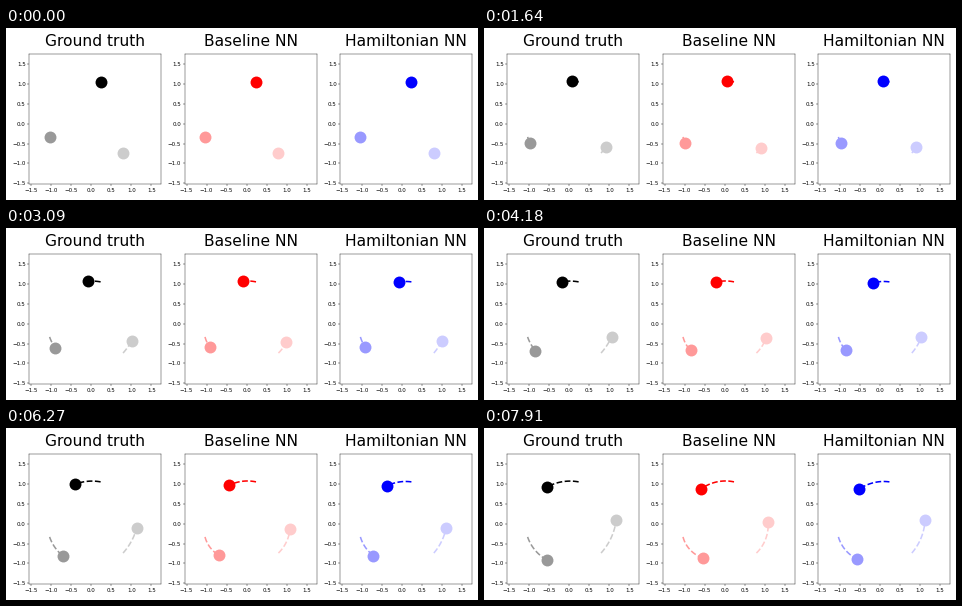
A matplotlib script for the animation above (8000 ms loop, 472x172 px).

```python
import numpy as np
import matplotlib.pyplot as plt
from matplotlib.animation import FuncAnimation
from matplotlib.colors import to_rgb

W, H, DPI = 472, 172, 56
FRAMES, LOOP = 88, 8000

# axes layout in pixels, measured from the top left
AX_W, AX_H, AX_TOP = 131.9, 130, 26.3
AX_LEFT, AX_STEP = 23.3, 155.4

START = [(0.235, 1.059), (-1.038, -0.332), (0.795, -0.739)]
STRENGTH = [1, 0.4, 0.2]

# title, colour, swing angle of the pull, end point of each body
PANELS = [
    ("Ground truth", "black", 0.73,
     [(-0.555, 0.927), (-0.55, -0.918), (1.17, 0.099)]),
    ("Baseline NN", "red", 0.83,
     [(-0.592, 0.878), (-0.535, -0.873), (1.084, 0.045)]),
    ("Hamiltonian NN", "blue", 0.75,
     [(-0.524, 0.875), (-0.574, -0.892), (1.122, 0.095)]),
]


def tint(color, strength):
    return tuple(1 - strength * (1 - c) for c in to_rgb(color))


def orbit(start, end, swing):
    """Harmonic motion around the origin, one row per frame."""
    s = np.linspace(0, 1, FRAMES)
    path = (np.outer(np.sin(swing * (1 - s)), start)
            + np.outer(np.sin(swing * s), end))
    return path / np.sin(swing)


def make_axes(fig, i, title):
    left = AX_LEFT + i * AX_STEP
    ax = fig.add_axes([left / W, 1 - (AX_TOP + AX_H) / H, AX_W / W, AX_H / H])
    ticks = np.arange(-1.5, 1.6, 0.5)
    ax.set(xticks=ticks, yticks=ticks,
           xlim=(-1.545, 1.7475), ylim=(-1.529, 1.756))
    ax.tick_params(labelsize=7, length=2.6, pad=1.9, width=0.5)
    for spine in ax.spines.values():
        spine.set_linewidth(0.5)
    ax.set_title(title, fontsize=20, pad=10.3)
    return ax


plt.rcParams["font.family"] = "DejaVu Sans"
fig = plt.figure(figsize=(W / DPI, H / DPI), dpi=DPI, facecolor="white")

bodies = []
for i, (title, color, swing, ends) in enumerate(PANELS):
    ax = make_axes(fig, i, title)
    for start, end, strength in zip(START, ends, STRENGTH):
        shade = tint(color, strength)
        trail, = ax.plot([], [], "--", color=shade, lw=2, zorder=2)
        dot = ax.scatter(*start, s=15.3 ** 2, color=[shade], linewidths=0,
                         zorder=3)
        bodies.append((orbit(start, end, swing), trail, dot))


def update(n):
    for path, trail, dot in bodies:
        trail.set_data(path[:n + 1, 0], path[:n + 1, 1])
        dot.set_offsets(path[n:n + 1])
    return [artist for _, *pair in bodies for artist in pair]


anim = FuncAnimation(fig, update, frames=FRAMES, interval=LOOP / FRAMES,
                     init_func=lambda: update(0), repeat=True, repeat_delay=0)
plt.show()
```
